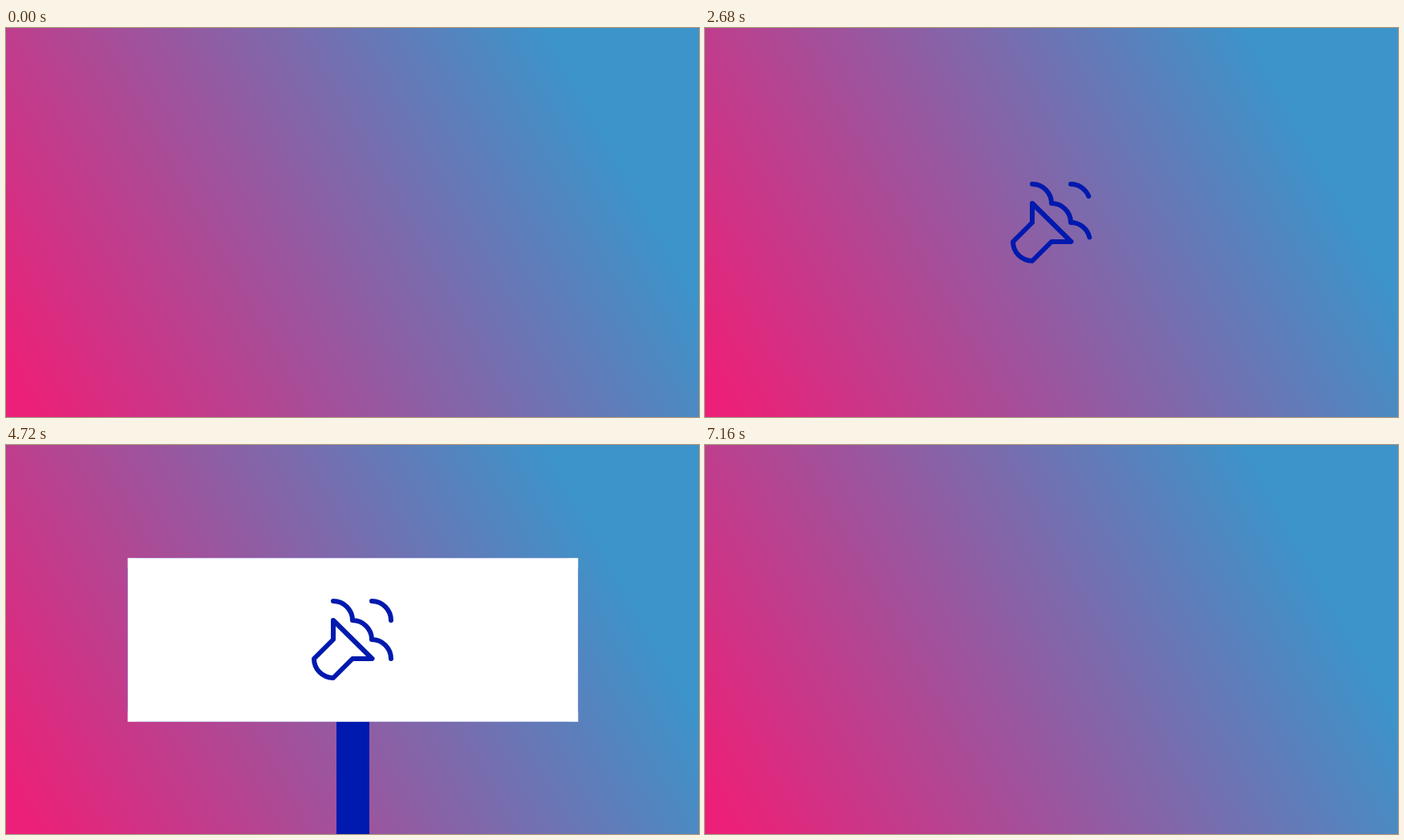
An HTML page with a canvas that plays this animation: 864x486 px, repeating every 7.32 s.

```html
<!DOCTYPE html>
<html lang="es">
<head>
<meta charset="utf-8">
<title>Campaña Publicitaria</title>
<style>
html, body { margin: 0; width: 100%; height: 100%; overflow: hidden; }
canvas { display: block; width: 864px; height: 486px; }
</style>
</head>
<body>
<canvas id="stage" width="864" height="486"></canvas>
<script>
const W = 864, H = 486, LOOP = 7320;
const BLUE = '#0019ae';
const CX = 432.5, CY = 243.5;
const ctx = document.getElementById('stage').getContext('2d');

const clamp = v => Math.min(1, Math.max(0, v));
const span = (t, a, b) => clamp((t - a) / (b - a));
const mix = (a, b, k) => a + (b - a) * k;
const inOut = k => k < 0.5 ? 4 * k ** 3 : 1 - 4 * (1 - k) ** 3;
const out = k => 1 - (1 - k) ** 3;
const smooth = k => k * k * (3 - 2 * k);

const backdrop = ctx.createLinearGradient(-179, 100, 516, -287);
backdrop.addColorStop(0, '#ec2078');
backdrop.addColorStop(1, '#3c94ca');

// Words rise out of a soft lower edge
const ink = ctx.createLinearGradient(0, 296, 0, 304);
ink.addColorStop(0, 'rgba(255,255,255,0.92)');
ink.addColorStop(1, 'rgba(255,255,255,0)');

const body = new Path2D(
  'M408 291 A24 24 0 0 1 384 267 L408 243 V219 L456.5 267 H432 Z');
const wave = new Path2D(
  'M408 195 A24 24 0 0 1 432 219 A24 24 0 0 1 456 243 A24 24 0 0 1 480 267');
const arc = new Path2D('M456 195 A24 24 0 0 1 480 219');
const bodyLen = 222.3;
const quarter = 24 * Math.PI / 2;

function trim(path, len, k) {
  if (k <= 0) return;
  ctx.setLineDash(k < 1 ? [len * k, 2 * len] : []);
  ctx.stroke(path);
}

function drawIcon(t) {
  const shown = (a, b, c, d) => smooth(span(t, a, b)) * (1 - smooth(span(t, c, d)));
  ctx.strokeStyle = BLUE;
  ctx.lineWidth = 6;
  ctx.lineCap = ctx.lineJoin = 'round';
  trim(body, bodyLen, shown(1660, 2290, 6700, 7130));
  trim(wave, 3 * quarter, shown(2160, 2770, 6640, 7000));
  trim(arc, quarter, shown(2400, 2815, 6600, 6900));
  ctx.setLineDash([]);
}

function drawWord(text, weight, x, spacing, t, start) {
  const k = inOut(span(t, start, start + 600));
  if (k <= 0) return;
  ctx.font = `${weight} 54px Inter, Lato, sans-serif`;
  ctx.letterSpacing = spacing + 'px';
  ctx.fillText(text, x, mix(347, 255, k));
}

function drawTitle(t) {
  const alpha = 1 - span(t, 1380, 1592);
  if (alpha <= 0) return;
  ctx.globalAlpha = alpha;
  ctx.fillStyle = ink;
  drawWord('Campaña', 300, 145.5, 0.6, t, 400);
  drawWord('Publicitaria', 700, 400.5, -0.9, t, 580);
  ctx.globalAlpha = 1;
}

function drawPost(t) {
  const k = out(span(t, 3720, 4040)) * (1 - inOut(span(t, 6240, 6680)));
  if (k <= 0) return;
  ctx.fillStyle = BLUE;
  ctx.beginPath();
  ctx.roundRect(412, mix(H, 330, k), 41, 200, 10);
  ctx.fill();
}

function drawPanel(t) {
  const size = out(span(t, 3360, 3800)) * (1 - inOut(span(t, 6000, 6480)));
  if (size <= 0) return;
  const k = inOut(span(t, 4560, 5220));
  const edge = 16.5 * smooth(span(t, 4700, 5220));
  const w = mix(584, 199, k), h = mix(199, 295, k);
  ctx.save();
  ctx.translate(CX, CY);
  ctx.scale(size, size);
  if (edge > 0) {
    ctx.fillStyle = BLUE;
    ctx.beginPath();
    ctx.roundRect(-w / 2 - edge, -h / 2 - edge, w + 2 * edge, h + 2 * edge,
      { x: mix(15, 5, k), y: mix(15, 26, k) });
    ctx.fill();
  }
  ctx.fillStyle = '#fff';
  ctx.fillRect(-w / 2, -h / 2, w, h);
  ctx.restore();
}

function frame(now) {
  const t = now % LOOP;
  ctx.fillStyle = backdrop;
  ctx.fillRect(0, 0, W, H);
  drawTitle(t);
  drawPost(t);
  drawPanel(t);
  drawIcon(t);
  requestAnimationFrame(frame);
}
requestAnimationFrame(frame);
</script>
</body>
</html>
```
